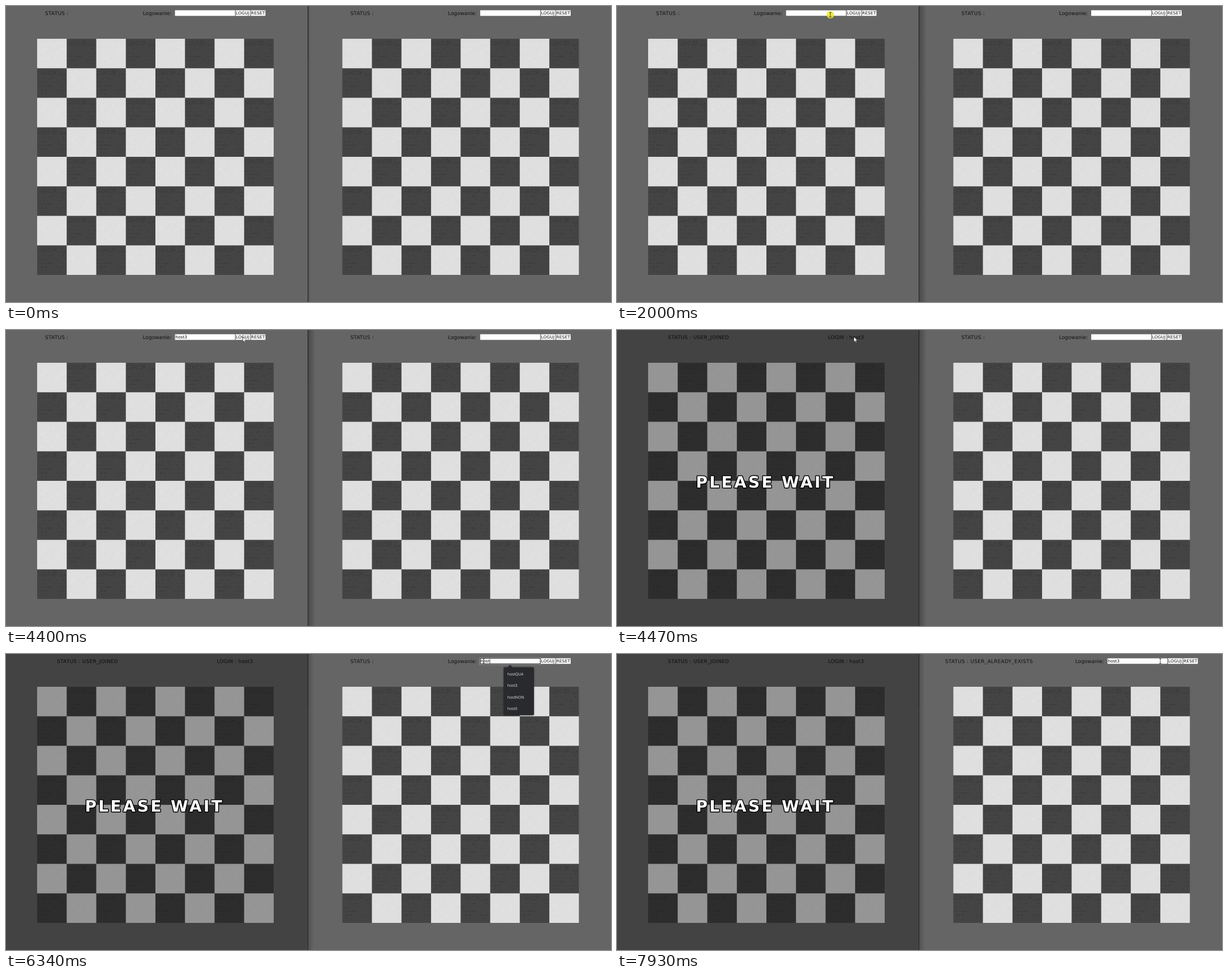
Recreate the animation shown at these times as an HTML page with a canvas. Size 1069x524 px, loop 8000 ms.

```html
<!DOCTYPE html>
<html lang="pl">
<head>
<meta charset="utf-8">
<title>Logowanie</title>
<style>
  html, body { margin: 0; width: 1069px; height: 524px; overflow: hidden; background: #656565; }
  canvas { display: block; }
</style>
</head>
<body>
<canvas id="stage" width="1069" height="524"></canvas>
<script>
const W = 1069, H = 524, LOOP = 8000;
const SPLIT = 533, SHIFT = 539.3, CELL = 52.25;
const LABEL = '8.91px "DejaVu Sans", sans-serif';
const FIELD = '7.42px "DejaVu Sans", sans-serif';
const MENU = '6.75px "Open Sans", "Noto Sans", sans-serif';
const TITLE = 'bold 27.9px "DejaVu Sans", sans-serif';
const NAME = 'host3';

const ctx = document.getElementById('stage').getContext('2d');

// Each login: when it is focused, typed, and submitted
const logins = [
  { x: 0, focus: 2090, blur: 4340, keys: [2610, 2810, 2880, 2940, 3270],
    items: ['hostQUA', '2', NAME, 'host5', 'hostNON'] },
  { x: SHIFT, focus: 5270, blur: 7860, keys: [6000, 6130, 6270, 6340, 6610],
    items: ['hostQUA', '2', NAME, 'hostNON', 'host5'] }
];
const JOINED = 4470, REFUSED = 7930;

// Pointer stops: time, x, y
const path = [
  [460, 938, 478], [1140, 390, 24], [1400, 390, 24], [1730, 377, 15.5],
  [2950, 377, 15.5], [3270, 379, 14.5], [3400, 379, 14.5], [3810, 418.5, 12],
  [4610, 418.5, 12], [4870, 630, 23], [5130, 844, 13], [6480, 844, 13],
  [6610, 842, 13], [6830, 842, 13], [7200, 925, 25], [7400, 925, 25], [7670, 960, 12.5]
];

// Clicks: start, length, x, y
const clicks = [[2000, 150, 377, 15.5], [4340, 60, 418.5, 12], [5200, 270, 844, 13], [7860, 70, 960, 13]];

function rng(seed) {
  return () => (seed = (seed * 16807) % 2147483647) / 2147483647;
}

function makeTile(seed, paint) {
  const tile = document.createElement('canvas');
  tile.width = tile.height = 52;
  paint(tile.getContext('2d'), rng(seed));
  return tile;
}

const darkTile = makeTile(71, (g, rnd) => {
  for (let i = 0; i < 95; i++) {
    const y = i < 42 ? 2 + rnd() * 9 : 4 + Math.floor(rnd() * 7) * 6.6 + rnd() * 2;
    g.fillStyle = `rgba(20,20,20,${0.12 + rnd() * 0.28})`;
    g.fillRect(1 + rnd() * 48, y, 0.8 + rnd() * 2, 0.8);
  }
});

const lightTile = makeTile(23, (g, rnd) => {
  for (let i = 0; i < 45; i++) {
    const x = rnd() * 50, y = rnd() * 50, len = 2 + rnd() * 5;
    g.strokeStyle = i % 2 ? 'rgba(255,255,255,.2)' : 'rgba(190,190,190,.16)';
    g.beginPath();
    g.moveTo(x, y);
    g.lineTo(x + len, y - len * 0.6);
    g.stroke();
  }
});

function text(str, x, y, font, color, spacing = 0) {
  ctx.font = font;
  ctx.letterSpacing = spacing + 'px';
  ctx.fillStyle = color;
  ctx.fillText(str, x, y);
}

function box(x, y, w, h, color, r = 0) {
  ctx.fillStyle = color;
  ctx.beginPath();
  ctx.roundRect(x, y, w, h, r);
  ctx.fill();
}

function drawBoard(x0, y0) {
  box(x0, y0, CELL * 8, CELL * 8, '#444');
  for (let i = 0; i < 64; i++) {
    const col = i % 8, row = i >> 3, light = (col + row) % 2 === 0;
    const x = x0 + col * CELL, y = y0 + row * CELL;
    if (light) box(x, y, CELL, CELL, '#dfdfdf');
    ctx.drawImage(light ? lightTile : darkTile, x, y);
  }
}

function typedCount(login, t) {
  return login.keys.filter(k => t >= k).length;
}

function inputLeft(login, t) {
  return 298.6 + login.x + (login.x && t >= REFUSED ? 28.6 : 0);
}

function drawForm(login, t, mouse) {
  const x = inputLeft(login, t), focused = t >= login.focus && t < login.blur;
  text('Logowanie:', x - 56.8, 16, LABEL, '#111');
  box(x + 106.4, 7.5, 54, 10, '#444');
  if (focused) {
    box(x - 1.2, 6.2, 108.6, 12.6, '#fff', 1.5);
    box(x - 0.6, 6.8, 107.4, 11.4, '#101010', 1);
    box(x + 0.5, 8, 105.2, 9, '#fff');
  } else {
    if (overInput(x, mouse)) box(x - 0.4, 7, 106.8, 11, '#333');
    box(x, 7.5, 106, 10, '#fff');
  }
  box(x + 107, 7.5, 26, 10, '#fff');
  box(x + 133.9, 7.5, 26, 10, '#fff');
  text('LOGUJ', x + 107.5, 15.3, FIELD, '#111', 0.2);
  text('RESET', x + 134.5, 15.3, FIELD, '#111', 0.15);

  const value = NAME.slice(0, typedCount(login, t));
  text(value, x + 0.7, 15.3, FIELD, '#111');
  if (focused) {
    const edits = [login.focus, ...login.keys].filter(k => k <= t);
    const since = t - edits[edits.length - 1];
    if (since % 1060 < 530) box(x + 0.8 + ctx.measureText(value).width, 8.4, 0.7, 8.3, '#111');
  }
}

function drawMenu(login, t) {
  if (t < login.focus) return;
  const fade = 1 - (t - login.keys[4] + 40) / 230;
  if (fade <= 0) return;
  const items = typedCount(login, t) ? login.items.filter(s => s !== '2') : login.items;
  const x = 340 + login.x, h = items.length * 20.2 + 4;
  ctx.save();
  ctx.globalAlpha = Math.min(1, fade);
  ctx.shadowColor = 'rgba(0,0,0,.4)';
  ctx.shadowBlur = 3;
  box(x, 23.6, 53.6, h, '#292a2d', 2);
  ctx.shadowColor = 'transparent';
  ctx.beginPath();
  ctx.moveTo(x + 6.5, 23.7);
  ctx.lineTo(x + 11.3, 18.8);
  ctx.lineTo(x + 16, 23.7);
  ctx.fill();
  items.forEach((s, i) => text(s, x + 6.7, 38.1 + i * 20.2, MENU, '#e8eaed'));
  ctx.restore();
}

function drawDivider(t) {
  const active = t >= 2000 && t < 5400;
  const reach = active ? 13 : t < 2000 ? 4 : 10;
  const shade = ctx.createLinearGradient(534, 0, 534 + reach, 0);
  shade.addColorStop(0, `rgba(0,0,0,${active ? 0.28 : 0.2})`);
  shade.addColorStop(1, 'rgba(0,0,0,0)');
  ctx.fillStyle = shade;
  ctx.fillRect(534, 0, reach, H);
  box(SPLIT, 0, 1, H, '#262626');
  box(SPLIT, 0, 1, 94, '#1c1c1c');
}

function drawWait() {
  box(0, 0, SPLIT, H, 'rgba(0,0,0,.335)');
  ctx.font = TITLE;
  ctx.letterSpacing = '3.4px';
  ctx.lineJoin = 'round';
  ctx.lineWidth = 3;
  ctx.strokeStyle = '#000';
  ctx.strokeText('PLEASE WAIT', 139.5, 278.8);
  text('PLEASE WAIT', 139.5, 278.8, TITLE, '#fff', 3.4);
}

function pointer(t) {
  if (t < path[0][0]) return null;
  const i = path.findIndex(p => p[0] > t);
  if (i < 0) return path[path.length - 1].slice(1);
  const [t0, x0, y0] = path[i - 1], [t1, x1, y1] = path[i];
  const u = (t - t0) / (t1 - t0), k = u * u * (3 - 2 * u);
  return [x0 + (x1 - x0) * k, y0 + (y1 - y0) * k];
}

function overInput(x, m) {
  return m && m[0] > x && m[0] < x + 106 && m[1] > 7 && m[1] < 18;
}

function drawPointer([x, y], beam) {
  ctx.beginPath();
  if (beam) {
    ctx.strokeStyle = '#222';
    ctx.lineWidth = 0.8;
    ctx.moveTo(x - 1.8, y - 4);
    ctx.lineTo(x + 1.8, y - 4);
    ctx.moveTo(x, y - 4);
    ctx.lineTo(x, y + 4);
    ctx.moveTo(x - 1.8, y + 4);
    ctx.lineTo(x + 1.8, y + 4);
    ctx.stroke();
    return;
  }
  const arrow = [[0, 0], [0, 9.2], [2.1, 7.3], [3.5, 10.5], [5, 9.9], [3.6, 6.8], [6.5, 6.6]];
  arrow.forEach(([dx, dy]) => ctx.lineTo(x + dx, y + dy));
  ctx.closePath();
  ctx.fillStyle = '#fff';
  ctx.fill();
  ctx.strokeStyle = '#111';
  ctx.lineWidth = 0.6;
  ctx.stroke();
}

function drawClicks(t) {
  for (const [start, length, x, y] of clicks) {
    const u = (t - start) / length;
    if (u < 0 || u >= 1 || (start === 5200 && t < 5270)) continue;
    ctx.fillStyle = `rgba(238,228,40,${0.85 * (1 - u)})`;
    ctx.beginPath();
    ctx.arc(x, y, 6.6 - u * 4, 0, Math.PI * 2);
    ctx.fill();
  }
}

function render(t) {
  ctx.textRendering = 'geometricPrecision';
  box(0, 0, W, H, '#656565');
  drawBoard(55, 58);
  drawBoard(55 + SHIFT, 58);
  drawDivider(t);

  const mouse = pointer(t), joined = t >= JOINED, refused = t >= REFUSED;
  const status = (s, x) => text('STATUS :' + s, x, 16, LABEL, '#111', 0.3);
  status(joined ? ' USER_JOINED' : '', joined ? 90 : 69);
  status(refused ? ' USER_ALREADY_EXISTS' : '', refused ? 579.7 : 608.4);

  if (joined) {
    text('LOGIN : ' + NAME, 372.7, 16, LABEL, '#111', 0.17);
    drawWait();
  } else {
    drawForm(logins[0], t, mouse);
    drawMenu(logins[0], t);
  }
  drawForm(logins[1], t, mouse);
  drawMenu(logins[1], t);

  drawClicks(t);
  if (mouse) {
    const beam = logins.some((l, i) => (i || !joined) && overInput(inputLeft(l, t), mouse));
    drawPointer(mouse, beam);
  }
}

const begin = performance.now();
function tick() {
  render((performance.now() - begin) % LOOP);
  requestAnimationFrame(tick);
}
tick();
</script>
</body>
</html>
```
